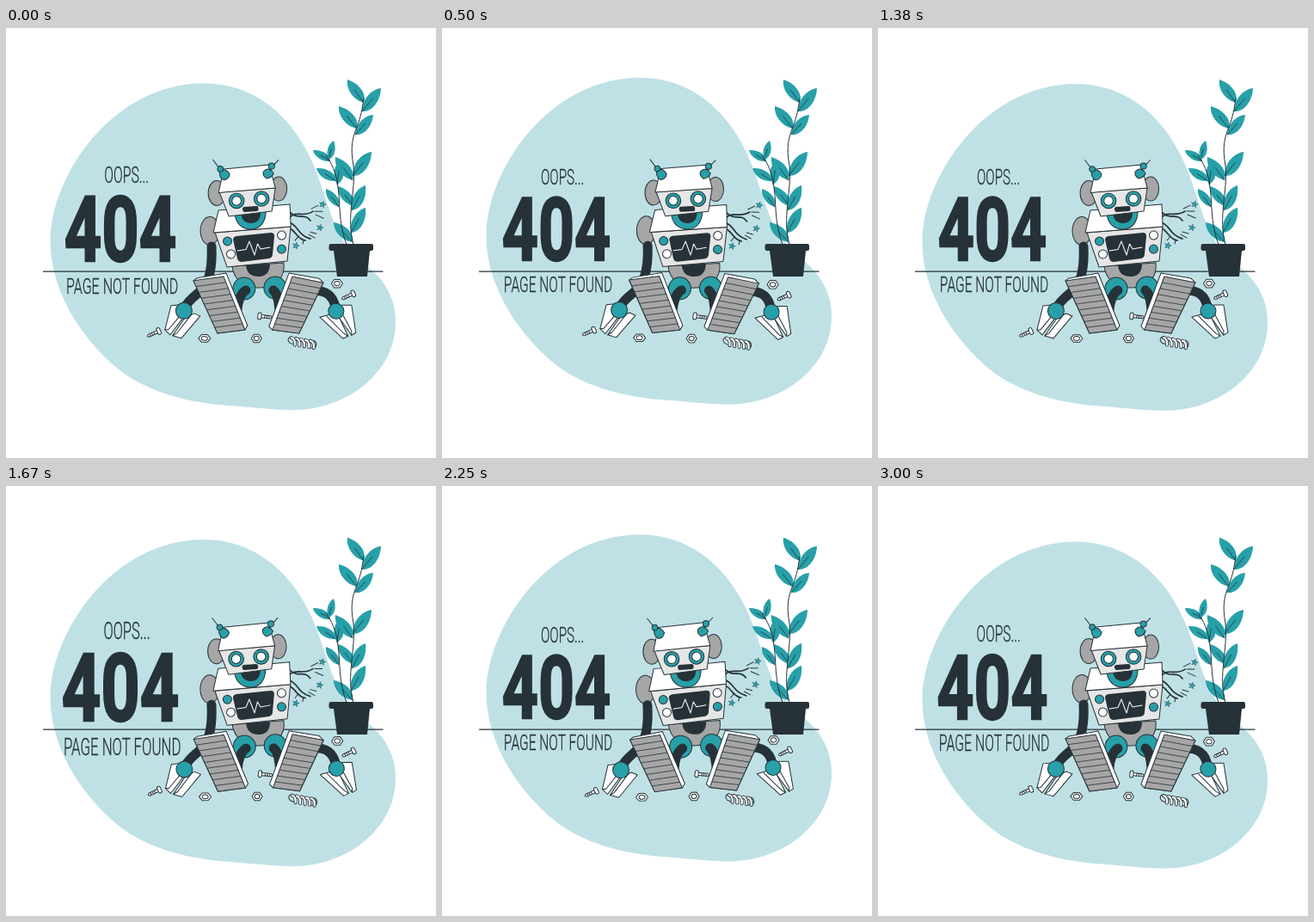
These frames come from a looping animation (500 px wide and 500 px high, 3.04 s). An HTML page:

```html
<!DOCTYPE html>
<html lang="en">
<head>
<meta charset="utf-8">
<title>404</title>
<style>
html, body { margin: 0; height: 100%; overflow: hidden; background: #fff; }
svg { display: block; width: 100vw; height: 100vh; }
text { font: 300 25.5px Roboto, "Open Sans", sans-serif; fill: #263238; stroke: #263238; stroke-width: .3; text-anchor: middle; }
.big { font-size: 102px; font-weight: 700; stroke-width: 2.4; }
.o { stroke: #263238; stroke-width: 1; stroke-linejoin: round; }
.d { fill: #263238; }
.t { fill: #27a0a9; }
.w { fill: #fff; }
.g { fill: #a6a6a6; }
.l { fill: #e6e6e6; }
.line { fill: none; stroke: #263238; stroke-linecap: round; stroke-linejoin: round; }
.limb { stroke-width: 11; }
</style>
</head>
<body>
<svg viewBox="0 0 500 500">
  <path id="blob" fill="#bfe1e6" d="M230 65C290 65 331 104 353 150C369 183 376 222 392 248C405 268 425 278 438 296C450 313 453 328 453 343C453 400 398 445 333 445C315 445 290 442 262 440C215 437 160 425 123 391C80 352 51.500 300 51.500 249C51.500 173 124 65 230 65Z"/>
  <path class="line" stroke-width="1.200" d="M43.500 283.200H438"/>

  <g id="plant">
    <g id="leaves"></g>
    <path class="line" d="M404 252C395 220 407 190 404 160C400 138 403 128 408 115C413 102 414 95 416 82M396 252C386 225 389 205 386 185C384 168 379 158 372 148"/>
    <path class="d" d="M378 251H425Q427 251 427 253V257Q427 259 425 259H423L420 289H385L381 259H378Q375.500 259 375.500 257V253Q375.500 251 378 251Z"/>
  </g>

  <g id="words">
    <g transform="translate(140 182) scale(.6 1)"><text>OOPS...</text></g>
    <g transform="translate(133 270) scale(.72 1)"><text class="big">404</text></g>
    <g transform="translate(135 307) scale(.61 1)"><text>PAGE NOT FOUND</text></g>
  </g>

  <g id="robot">
    <!-- loose wires and sparks -->
    <path class="line" stroke-width="1.700" d="M329 221C337 211 345 221 357 213M330 214C340 224 347 214 354 224M329 226C340 229 338 240 354 245M330 233C337 236 339 246 348 247"/>
    <path class="line" d="M355 210L363 206M359 213L368 213M360 217L369 221M354 237L361 239M352 240L359 244M340 242L336 247M346 246L345 251"/>
    <g id="stars" class="o" stroke-width=".4"></g>

    <!-- arms -->
    <ellipse class="g o" cx="237" cy="236" rx="11" ry="16.500"/>
    <path class="line limb" d="M239 254C240 275 238 292 229 303C222 311 214 314 208 325"/>
    <path class="line limb" d="M358 305C372 305 380 310 383 324"/>

    <!-- hips and legs -->
    <path class="g o" d="M263 277L323 273C325 290 314 302 295 302C276 303 265 292 263 277Z"/>
    <path class="d" d="M279 276L307 274C307 284 302 289 294 289C285 289 280 285 279 276Z"/>
    <circle class="t o" cx="277" cy="303" r="13"/>
    <circle class="t o" cx="313" cy="302" r="13"/>
    <path class="line limb" d="M279 305C272 309 270 318 269 328M311 305C317 310 317 320 318 327"/>

    <!-- body -->
    <path class="l o" d="M243 238L331 231L327 271L257 278Z"/>
    <path class="w o" d="M247 212L330 205L331 231L241 238Z"/>
    <path class="t o" d="M266 216L302 213C302 226 295 234 285 234C274 234 267 227 266 216Z"/>
    <path class="d" d="M273 216L296 214C296 222 292 227 285 227C278 227 274 223 273 216Z"/>
    <path class="d" d="M268 242L308 238Q312 238 312 242L310 263Q310 267 306 268L274 272Q270 272 269 268L264 246Q264 243 268 242Z"/>
    <path class="line" style="stroke:#fff" d="M269 259L279 257.500L283 248L289 264L292.500 251L296 257L307 255"/>
    <circle class="t o" cx="257.500" cy="248" r="5"/>
    <circle class="w o" cx="261.500" cy="263" r="5"/>
    <circle class="w o" cx="320.500" cy="241" r="5"/>
    <circle class="t o" cx="320.500" cy="257" r="5"/>

    <!-- head -->
    <ellipse class="g o" cx="245" cy="192" rx="10" ry="14.500"/>
    <ellipse class="g o" cx="317" cy="187" rx="9.500" ry="14"/>
    <path class="l o" d="M248 191L313 186L309 213L259 219Z"/>
    <path class="w o" d="M253 164L306 159L313 186L247 191.500Z"/>
    <g id="eyes"></g>
    <rect class="d" x="275" y="207.500" width="18.500" height="6" rx="2.500" transform="rotate(-4 284 211)"/>
    <path class="line" d="M253 170L240.500 153.500M303 168L316.500 153.500"/>
    <path class="t o" d="M248 168Q254 161 260 170Q259 176 253 177Q248 174 248 168ZM299 167Q305 160 311 169Q309 174 303 175Q298 172 299 167Z"/>
    <circle class="t o" cx="249" cy="164" r="3.300"/>
    <circle class="t o" cx="308.500" cy="160.500" r="3.600"/>

    <!-- feet -->
    <g id="feet" class="o"></g>

    <!-- hands -->
    <path class="w o" d="M192 323L203 322L207 336L191 357L185 351Z"/>
    <path class="w o" d="M209 336L219 332L226 335L204 361L194 358Z"/>
    <path class="w o" d="M376 333L365 336L392 361L398 358L388 337Z"/>
    <path class="w o" d="M391 322L402 322L407 354L402 357L387 336Z"/>
    <path class="line" d="M185 351L189 351L204 333M194 358L199 355L216 333M398 358L393 355L373 335M402 357L402 352L390 330"/>
    <circle class="t o" cx="207" cy="329" r="9.500"/>
    <circle class="t o" cx="384" cy="329" r="9"/>

    <g id="bits" class="o w"></g>
    <g id="coil"></g>
  </g>
</svg>
<script>
const $ = id => document.getElementById(id);

function leaf([bx, by, tx, ty]) {
  const dx = tx - bx, dy = ty - by;
  const side = (a, k) => `${bx + a * dx - k * dy} ${by + a * dy + k * dx}`;
  return `<path class="t" d="M${bx} ${by}C${side(.2, .28)} ${side(.65, .26)} ${tx} ${ty}C${side(.8, -.2)} ${side(.35, -.28)} ${bx} ${by}Z"/>
    <path class="line" stroke-width=".8" d="M${bx} ${by}L${side(.55, 0)}"/>`;
}

function star([x, y]) {
  const points = Array.from({length: 10}, (_, i) => {
    const a = i * Math.PI / 5 - 1.3, r = i % 2 ? 1.8 : 4.2;
    return [x + r * Math.cos(a), y + r * Math.sin(a)];
  });
  return `<polygon class="t" style="stroke-width:.4" points="${points}"/>`;
}

const eye = (x, y) => `<circle class="t o" cx="${x}" cy="${y}" r="8.800"/><circle class="w o" cx="${x}" cy="${y}" r="5.300"/>`;

// a, b, c, d: corners of the sole, clockwise from the upper left
function sole(a, b, c, d) {
  const mix = (p, q, k) => p.map((v, i) => v + (q[i] - v) * k);
  let rows = "";
  for (let i = 1; i < 9; i++) rows += `M${mix(a, d, i / 9)}L${mix(b, c, i / 9)}`;
  return `<polygon class="g" points="${[a, b, c, d]}"/><path stroke-width=".8" d="${rows}"/>`;
}

const nut = (x, y, rx, ry) =>
  `<path d="M${x - rx} ${y}l${rx * .5} ${-ry}h${rx}l${rx * .5} ${ry}l${-rx * .5} ${ry}h${-rx}Z"/><ellipse cx="${x}" cy="${y}" rx="${rx * .5}" ry="${ry * .55}"/>`;

const screw = (x, y, turn) =>
  `<g transform="translate(${x} ${y}) rotate(${turn})"><path d="M-12 -1.600H1V1.600H-12L-13.500 0ZM-10 -1.600v3.200M-7.500 -1.600v3.200M-5 -1.600v3.200"/><rect x="-1" y="-4" width="4" height="8" rx="2"/></g>`;

$("leaves").innerHTML = [
  [416, 87, 397, 60], [414, 97, 436, 70], [408, 117, 387, 91], [406, 124, 427, 101],
  [403, 177, 383, 150], [403, 172, 425, 144], [404, 207, 386, 184], [402, 212, 418, 183],
  [401, 238, 418, 209], [403, 249, 381, 226], [375, 153, 381, 131], [377, 155, 357, 142],
  [384, 178, 361, 163], [385, 182, 389, 153], [387, 208, 372, 187]
].map(leaf).join("");

$("stars").innerHTML = [[368, 205], [365, 232], [337, 253]].map(star).join("");
$("eyes").innerHTML = eye(268, 201) + eye(297, 198.500);
$("feet").innerHTML =
  '<path class="w" d="M218 294L222 291L256 285L281 346L278 351L246 355Z"/>' +
  sole([218, 294], [253, 289], [278, 351], [246, 355]) +
  '<path class="w" d="M329 285L364 291L369 296L341 355L310 351L306 347Z"/>' +
  sole([333, 289], [369, 296], [341, 355], [310, 351]);
$("bits").innerHTML =
  nut(231, 361, 7, 4.300) + nut(291.500, 361, 6, 4.800) + nut(385, 297, 6.500, 4.800) +
  screw(177, 353, -25) + screw(403, 309, -25) + screw(296, 335, 186);

// each turn is a white wire with a dark edge
let turns = `<path class="line" stroke-width="1" d="M331 359Q326 361 330 366L335 368M358 363Q363 366 360 371L354 372"/>`;
for (let i = 0; i < 5; i++) {
  const d = `M${332 + i * 5.5} ${360 + i * .9}q5 1 4 8.500`;
  turns += `<path class="line" stroke-width="4" d="${d}"/><path class="line" style="stroke:#fff" stroke-width="2.200" d="${d}"/>`;
}
$("coil").innerHTML = turns;

// 1 to 1.1 and back, then rest; two beats per cycle
function beat(u) {
  const p = u % 1500;
  return 1 + .1 * Math.max(0, p < 300 ? p / 300 : (450 - p) / 150);
}

function sway(u) {
  return u < 750 ? u / 750 : u < 2250 ? (1500 - u) / 750 : (u - 3000) / 750;
}

function draw(now) {
  const u = (now % 3040 / 3040 * 3000 + 95) % 3000;
  const lift = 1 - Math.abs(u % 1500 / 750 - 1);
  $("blob").setAttribute("transform", `translate(0 ${.6 - 10 * lift})`);
  $("words").setAttribute("transform", `translate(133 235) scale(${beat(u)}) translate(-133 -235)`);
  $("robot").setAttribute("transform", `rotate(${sway(u)} 286 263)`);
}

const start = performance.now();
function tick() {
  draw(performance.now() - start);
  requestAnimationFrame(tick);
}
tick();
</script>
</body>
</html>
```
